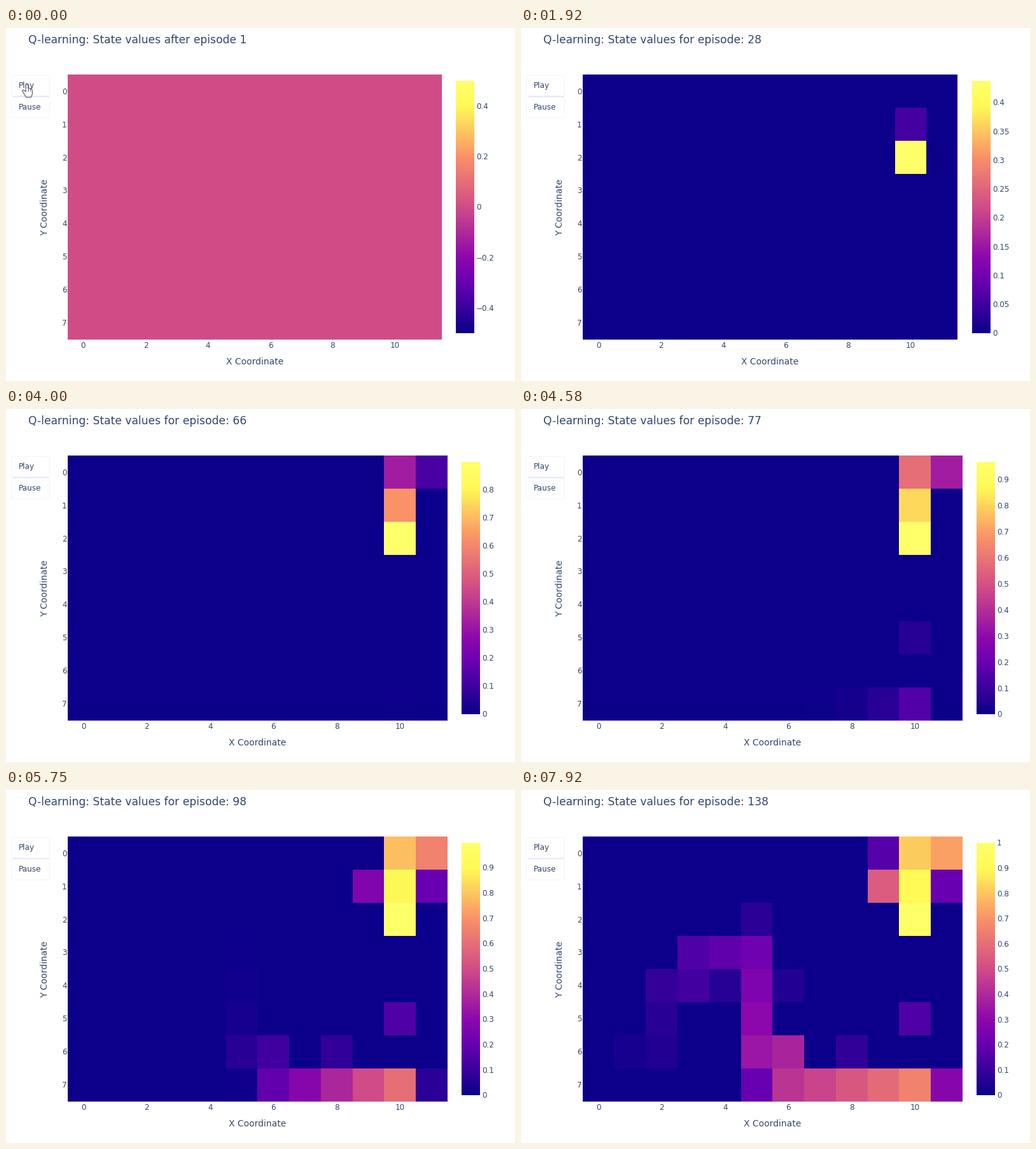
Write a matplotlib script that moves like this. It is 800x554 px and loops after 8000 ms.

```python
import math

import numpy as np
import matplotlib.pyplot as plt
from matplotlib.animation import FuncAnimation
from matplotlib.colors import LinearSegmentedColormap
from matplotlib.patches import FancyBboxPatch, Polygon

W, H, DPI = 800, 554, 64
PT = 72 / DPI
INTERVAL, FRAMES = 40, 200
FPS = 12
INK, EDGE = "#33476a", "#44464c"
LEFT, TOP, BOTTOM = 97, 73, 488.7
BAR_TOP, BAR_BOTTOM, BAR_W = 83, 479, 29
COLS, ROWS = 12, 8
RATE, DISCOUNT = 0.25, 0.9

CMAP = LinearSegmentedColormap.from_list("heat", [
    (0, "#0c008a"), (0.2, "#6800b1"), (0.3, "#8d08ac"), (0.5, "#d14c87"),
    (0.7, "#fa9168"), (0.9, "#fffa56"), (1, "#ffff6a")])

STEPS = {"L": (-1, 0), "R": (1, 0), "U": (0, -1), "D": (0, 1)}


def walk(x, y, moves):
    path = [(x, y)]
    for m in moves:
        dx, dy = STEPS[m]
        x, y = x + dx, y + dy
        path.append((x, y))
    return path


# Values spread backwards along these two paths
CORNER = walk(10, 2, "UUR")
TRAIL = walk(10, 7, "LLLLULUUULLDLDDL")

# Cells off the paths: x, y, first episode, value
GROWING = [(9, 1, 84, 0.62), (9, 0, 105, 0.22), (5, 7, 97, 0.25),
           (4, 4, 115, 0.1), (11, 7, 119, 0.4)]
VISITED = [(11, 1, 90, 0.2), (10, 5, 70, 0.06), (10, 5, 88, 0.09),
           (8, 6, 90, 0.08), (11, 7, 94, 0.07), (6, 4, 110, 0.05),
           (5, 2, 130, 0.07)]


def episode_at(k):
    ep = np.interp(k, (5, 12, 69, 82, 95), (1, 11, 98, 119, 138))
    return math.floor(ep + 0.5)


def hits_at(ep):
    """Number of times the goal has been reached."""
    x = ep - 10
    return 0 if x < 0 else int(1 + 0.1 * x + 2.2e-7 * x ** 4)


def backed_up(n, j):
    """Share of the final value that n backups carry j cells away."""
    return 1 - sum(math.comb(n, m) * RATE ** m * (1 - RATE) ** (n - m)
                   for m in range(min(n, j) + 1))


def grid_at(ep):
    grid = np.zeros((ROWS, COLS))
    hits = hits_at(ep)
    if not hits:
        return grid
    for j, (x, y) in enumerate(CORNER):
        n = round(1.15 * hits) if j else hits
        grid[y, x] = DISCOUNT ** j * backed_up(n, j)

    front = 0.243 * (ep - 83.2)
    spread = max(1, 2 + 0.03 * (ep - 77))
    for j, (x, y) in enumerate(TRAIL):
        share = 0.5 + 0.5 * math.erf((front - j) / spread / math.sqrt(2))
        grid[y, x] = 0.66 * DISCOUNT ** j * share

    for x, y, start, value in GROWING:
        grid[y, x] += value * (1 - math.exp(-max(0, ep - start) / 25))
    for x, y, start, value in VISITED:
        grid[y, x] += value * (ep >= start)
    return grid


def scale_for(peak):
    """Colour range, tick step, right plot edge and left bar edge."""
    if peak == 0:
        return -0.5, 0.5, 0.2, 685, 707
    if peak <= 0.5:
        return 0, peak, 0.05, 686, 709
    return 0, peak, 0.1, 694, 716


def paint(grid, lo, hi, right, bar_x):
    """Heat map and colour bar as one stage-sized picture."""
    img = np.full((H, W, 4), 255, np.uint8)
    rows = np.arange(TOP, round(BOTTOM))
    cols = np.arange(LEFT, right)
    r = ((rows + 0.5 - TOP) * ROWS / (BOTTOM - TOP)).astype(int)
    c = ((cols + 0.5 - LEFT) * COLS / (right - LEFT)).astype(int)
    cells = CMAP((grid - lo) / (hi - lo), bytes=True)
    r = np.minimum(r, ROWS - 1)
    img[TOP:round(BOTTOM), LEFT:right] = cells[np.ix_(r, c)]
    ramp = CMAP(np.linspace(1, 0, BAR_BOTTOM - BAR_TOP), bytes=True)
    img[BAR_TOP:BAR_BOTTOM, bar_x:bar_x + BAR_W] = ramp[:, None]
    return img


fig = plt.figure(figsize=(W / DPI, H / DPI), dpi=DPI, facecolor="white")
picture = fig.figimage(np.full((H, W, 4), 255, np.uint8), zorder=-1)
ax = fig.add_axes([0, 0, 1, 1])
ax.axis("off")
ax.set_xlim(0, W)
ax.set_ylim(H, 0)


def label(x, y, s="", size=12, ha="left", **kw):
    return ax.text(x, y, s, fontsize=size * PT, family="DejaVu Sans",
                   color=INK, ha=ha, **kw)


title = label(35, 24, size=17.15)
x_title = label(391, 528.5, "X Coordinate", 13.9, "center")
label(60.7, 281, "Y Coordinate", 13.9, "center", va="center", rotation=90)
x_ticks = [label(0, 502.4, str(n), ha="center") for n in range(0, COLS, 2)]
row_h = (BOTTOM - TOP) / ROWS
for n in range(ROWS):
    label(95.7, TOP + (n + 0.5) * row_h + 4.6, str(n), ha="right")
bar_ticks = [label(0, 0) for _ in range(11)]

for y, name in ((74.5, "Play"), (109, "Pause")):
    ax.add_patch(FancyBboxPatch((8.5, y), 60, 32, fc="white", ec="#f3f4fb",
                                boxstyle="round,pad=0,rounding_size=2",
                                lw=PT))
    label(20, y + 19.3, name)
ax.plot((11, 67), (106.5, 106.5), color="#e2dff7", lw=PT)

# Pointing hand, relative to its top left corner
HAND = np.array([
    (6, 2), (8, 0.7), (10, 2), (10, 8), (13, 7.6), (16, 9.5), (16.5, 16),
    (14.5, 21.5), (6.5, 21.5), (0.5, 11.5), (2.5, 10.2), (6, 13)])
hand = Polygon(HAND, closed=True, fc=(1, 1, 1, 0.75), ec=EDGE, lw=PT,
               joinstyle="round", zorder=5)
ax.add_patch(hand)
creases = [ax.plot([], [], color=EDGE, lw=0.8 * PT, zorder=6)[0]
           for _ in range(2)]


def place_hand(k):
    y = 87 - 7 * max(0, k - 7) ** 2
    hand.set_xy(HAND + (25, y))
    for line, x in zip(creases, (35, 38)):
        line.set_data((x, x), (y + 8, y + 12))


def update(i):
    k = int((i * INTERVAL + 36) * FPS / 1000)
    ep = episode_at(k)
    grid = grid_at(ep)
    lo, hi, step, right, bar_x = scale_for(grid.max())

    tail = f"for episode: {ep}" if k >= 5 else "after episode 1"
    title.set_text("Q-learning: State values " + tail)
    picture.set_data(paint(grid, lo, hi, right, bar_x))

    col_w = (right - LEFT) / COLS
    for n, t in enumerate(x_ticks):
        t.set_x(LEFT + (2 * n + 0.5) * col_w)
    x_title.set_x((LEFT + right) / 2)

    first = math.ceil(lo / step)
    for n, t in enumerate(bar_ticks):
        v = round((first + n) * step, 2)
        t.set_visible(v <= hi + 1e-4)
        t.set_text(f"{v:g}".replace("-", "\u2212"))
        frac = (v - lo) / (hi - lo)
        t.set_position((bar_x + BAR_W + 3,
                        BAR_BOTTOM - frac * (BAR_BOTTOM - BAR_TOP) + 4.4))

    place_hand(k)
    return [picture, title, x_title, hand, *creases, *x_ticks, *bar_ticks]


anim = FuncAnimation(fig, update, frames=FRAMES, interval=INTERVAL,
                     repeat=True, repeat_delay=0, blit=False)
plt.show()
```
